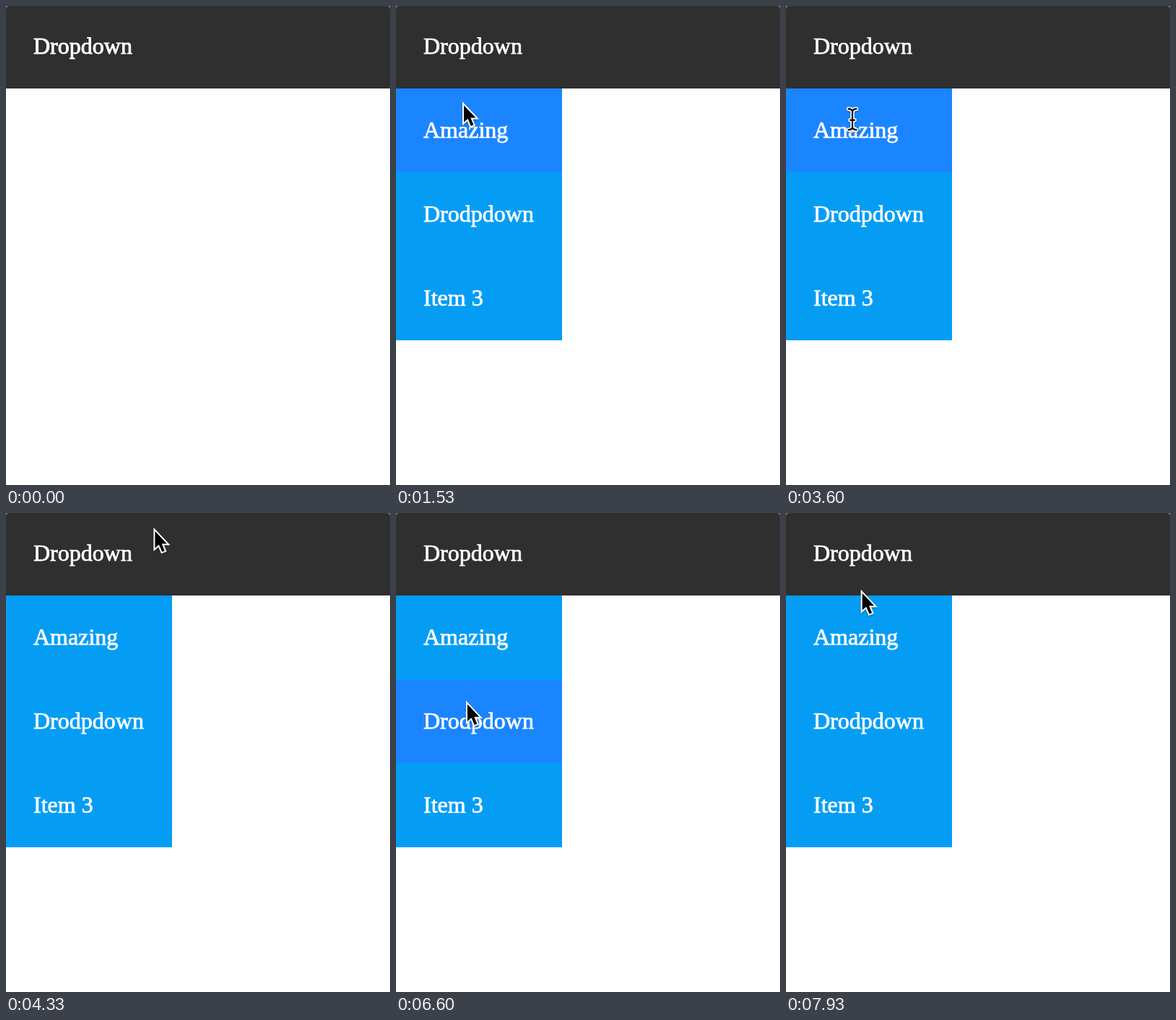
An HTML page for the animation above (8000 ms loop, 532 px wide and 662 px high).

```html
<!DOCTYPE html>
<html lang="en">
<head>
<meta charset="utf-8">
<title>Dropdown</title>
<style>
  html, body { margin: 0; width: 100%; height: 100%; overflow: hidden; background: #fff; }
  svg { display: block; width: 532px; height: 662px; }
  text { font: 32px "Liberation Serif", "Times New Roman", serif; fill: #fff; stroke: #fff; stroke-width: .75px; }
  #pointer { filter: drop-shadow(0 1px 1px rgba(0, 0, 0, .35)); }
  .edge { stroke: #fff; stroke-width: 4; }
  #ibeam { fill: none; stroke-linecap: round; }
</style>
</head>
<body>
<svg viewBox="0 0 532 662">
  <defs>
    <path id="arrowShape" d="M2 4.8V28.4L7.5 23.5 11.8 33.5 15.5 32 11.3 22.2H18.5Z"/>
    <path id="beamShape" d="M-5.5 -14.5Q-1 -14.5 0 -11Q1 -14.5 5.5 -14.5M0 -11V11M-5.5 14.5Q-1 14.5 0 11Q1 14.5 5.5 14.5M-3 1H3"/>
  </defs>
  <rect width="532" height="20" fill="#858585"/>
  <path d="M0 114V5Q0 0 5 0H527Q532 0 532 5V114Z" fill="#2f2f2f"/>
  <text id="title" x="38" y="66">Dropdown</text>
  <g id="menu"></g>
  <g id="pointer">
    <g id="arrow"><use href="#arrowShape" class="edge"/><use href="#arrowShape"/></g>
    <g id="ibeam">
      <use href="#beamShape" stroke="#fff" stroke-width="5.5"/>
      <use href="#beamShape" stroke="#000" stroke-width="2.2"/>
    </g>
  </g>
</svg>
<script>
const LOOP = 8000, ENTER = 70;
const TOP = 114, ROW = 116, WIDTH = 230, PAD = 38;
const BLUE = '#059df4', HOVER = '#1b85ff';
const $ = id => document.getElementById(id);

const clamp = u => Math.min(1, Math.max(0, u));
const ease = u => u * u * (3 - 2 * u);
const mix = (a, b, u) => a + (b - a) * u;
const ramp = (t, from, to) => ease(clamp((t - from) / (to - from)));

function make(tag, attrs) {
  const el = document.createElementNS('http://www.w3.org/2000/svg', tag);
  for (const key in attrs) el.setAttribute(key, attrs[key]);
  return $('menu').appendChild(el);
}

const texts = [$('title')];
const rows = ['Amazing', 'Drodpdown', 'Item 3'].map((label, i) => {
  const y = TOP + i * ROW;
  const row = make('rect', { y, width: WIDTH, height: ROW });
  const text = make('text', { x: PAD, y: y + 68 });
  text.textContent = label;
  texts.push(text);
  return row;
});

// Eased line from a to b, bulging to the right
const glide = (a, b, bulge = 0) => u =>
  [mix(a[0], b[0], ease(u)) + bulge * Math.sin(Math.PI * u), mix(a[1], b[1], ease(u))];

// Down through the items and back up
const dip = ([x, y], dx, dy) => u => {
  const s = Math.sin(Math.PI * u);
  return [x + dx * s, y + dy * s];
};

// Clockwise round trip beside the menu, gaining speed
const orbit = u => {
  const a = mix(-86, 176, u ** 1.6) * Math.PI / 180;
  return [198 + 92 * Math.cos(a), 104 + 84 * Math.sin(a)];
};

const rest = [92, 92], high = [204, 20], back = [104, 98];
const moves = [
  { from: ENTER, to: 880, at: glide([475, 230], rest) },
  { from: 1420, to: 3780, at: dip(rest, 0, 274) },
  { from: 3780, to: 4330, at: glide(rest, high, 110) },
  { from: 4330, to: 5870, at: orbit },
  { from: 5870, to: 6050, at: glide([106, 110], back) },
  { from: 6300, to: 7945, at: dip(back, -13, 297) }
];

function pointerAt(t) {
  const move = moves.filter(m => t >= m.from).pop() || moves[0];
  return move.at(clamp((t - move.from) / (move.to - move.from)));
}

const menuAt = t => ramp(t, 690, 900) - ramp(t, 4520, 4740) + ramp(t, 5880, 6070);

function overText(x, y, open) {
  return texts.some((text, i) => {
    const base = 66 + i * ROW;
    return (open || i === 0) && x >= PAD && x <= PAD + text.getComputedTextLength()
      && y >= base - 29 && y <= base + 8;
  });
}

const show = (id, on) => $(id).setAttribute('display', on ? 'inline' : 'none');

function draw(t) {
  const [x, y] = pointerAt(t);
  const shown = menuAt(t);
  const open = shown > 0.01;
  const hovered = open && x < WIDTH ? Math.floor((y - TOP) / ROW) : -1;
  const typing = overText(x, y, open);

  $('menu').setAttribute('opacity', open ? shown : 0);
  $('title').style.strokeWidth = open ? '.75px' : '.95px';
  rows.forEach((row, i) => row.setAttribute('fill', i === hovered ? HOVER : BLUE));

  $('pointer').setAttribute('transform', `translate(${x.toFixed(2)} ${y.toFixed(2)})`);
  show('pointer', t >= ENTER);
  show('arrow', !typing);
  show('ibeam', typing);
}

const start = performance.now();
function tick() {
  draw((performance.now() - start) % LOOP);
  requestAnimationFrame(tick);
}
tick();
</script>
</body>
</html>
```
